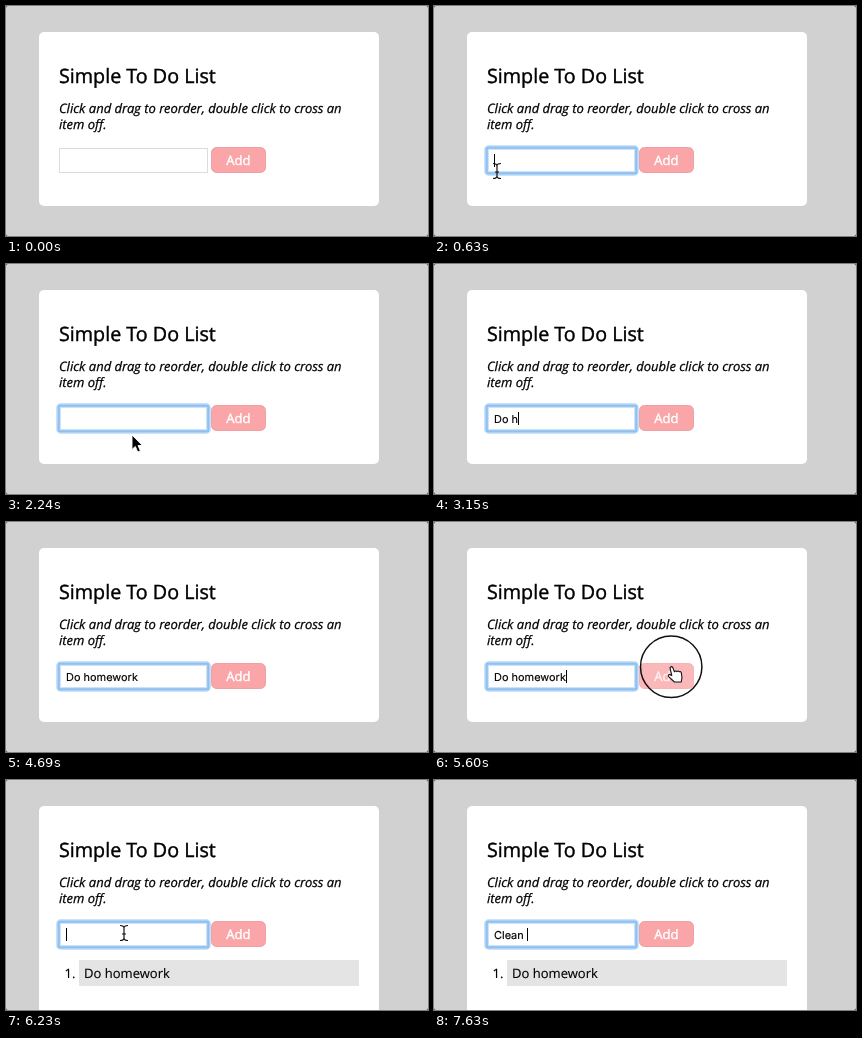
Animation of 422 by 230 pixels, one loop 8000 ms. Source, as an HTML page:

```html
<!DOCTYPE html>
<html lang="en">
<head>
<meta charset="utf-8">
<title>Simple To Do List</title>
<style>
  html, body { margin: 0; width: 100%; height: 100%; overflow: hidden; background: #333; }
  svg { display: block; width: 422px; height: 230px; border-radius: 2px; font: 13.03px "Open Sans", sans-serif; text-rendering: geometricPrecision; }
  text { stroke: #000; stroke-width: .15px; }
  .title { font-size: 19.7px; stroke-width: .4px; }
  .note { font-style: italic; stroke-width: .25px; }
  #typed { font: 10.95px Inter, sans-serif; white-space: pre; }
  #face { fill: #faa5a8; stroke: #f0a0a4; }
  #label { fill: #fff; stroke: #fff; stroke-width: .45px; }
  .hover #face { fill: #fbb8ba; stroke: #f7b3b6; }
  .hover #label { fill: #fff0f0; stroke: #fff0f0; }
  .off { visibility: hidden; }
</style>
</head>
<body>
<svg id="stage" viewBox="0 0 422 230">
  <rect width="422" height="230" fill="#d1d1d1"/>
  <rect id="card" x="33" y="26" width="340" height="174" rx="5" fill="#fff"/>
  <text class="title" x="53" y="77">Simple To Do List</text>
  <text class="note" x="53" y="107">Click and drag to reorder, double click to cross an</text>
  <text class="note" x="53" y="123">item off.</text>

  <rect x="53.5" y="142.5" width="148" height="24" fill="#fff" stroke="#dcdce0"/>
  <g id="ring" fill="none" stroke="#82bbf3">
    <rect x="52.5" y="141.5" width="150" height="26" rx="2.5" stroke-width="5" opacity=".42"/>
    <rect x="52.5" y="141.5" width="150" height="26" rx="1.5" stroke-width="2" opacity=".85"/>
  </g>
  <text id="typed" x="60" y="159" xml:space="preserve"></text>
  <rect id="caret" y="148" width="1" height="13"/>

  <g id="button">
    <rect id="face" x="205.5" y="141.5" width="54" height="25" rx="5"/>
    <text id="label" x="220.3" y="159">Add</text>
  </g>

  <g id="item">
    <rect x="73" y="180" width="280" height="26" fill="#e4e4e4"/>
    <text x="58.5" y="198">1.</text>
    <text x="78" y="198">Do homework</text>
  </g>

  <g id="pointer">
    <circle id="press" r="30.7" fill="none" stroke="#111" stroke-width="1.5"/>
    <path id="arrow" d="M0 0V14.5L3.3 11.4L5.8 17L8.4 15.9L6 10.5H10.4Z" stroke="#fff" stroke-width=".9"/>
    <path id="beam" d="M-4-7.5Q0-7.5 0-5Q0-7.5 4-7.5M0-5V5M-4 7.5Q0 7.5 0 5Q0 7.5 4 7.5M-2 1H2" fill="none" stroke="#111" stroke-width="1.2"/>
    <path id="hand" d="M-1.2 1.1Q.1-1.1 1.6.9L3.2 5.1Q4.6 3.5 5.7 4.9Q7 3.7 8 5.1Q9.8 4.4 10.2 6.5L10.8 11L10 15.3H3.2L-2.6 9.9Q-3.6 7.7-1.4 7.8L.6 8.9Z" fill="#fff" stroke="#111" stroke-width="1.1" stroke-linejoin="round"/>
  </g>
</svg>
<script>
  const LOOP = 8000, STEP = 70;
  const $ = id => document.getElementById(id);
  const show = (id, on) => $(id).classList.toggle('off', !on);
  const within = (t, a, b) => t >= a && t < b;

  const ADDED = 5740, FOCUS = 420;
  const entries = [
    { text: 'Do homework', until: ADDED,
      keys: [2520, 2660, 2870, 3150, 3360, 3430, 3570, 3780, 3990, 4060, 4200] },
    { text: 'Clean ', until: LOOP, keys: [6930, 7070, 7140, 7350, 7490, 7630] }
  ];
  // Each move: start, end, from, bend, to
  const moves = [
    [70, 420, [190, 32], [110, 130], [63, 165]],
    [910, 1470, [63, 165], [95, 146], [126, 171]],
    [5110, 5480, [126, 171], [185, 168], [237.2, 144.7]],
    [5950, 6230, [237.2, 144.7], [180, 146], [118, 153]]
  ];
  const visible = [[70, 2520], [5110, 6930]];
  const presses = [[420, 630], [5530, 5740]];
  const caretOn = [[630, 1190], [1750, 2240], [2520, 4690], [5180, 5690], [6190, 6720], [6930, LOOP]];
  const any = (spans, t) => spans.some(([a, b]) => within(t, a, b));

  function position(t) {
    const [a, b, p, q, r] = moves.filter(m => t >= m[0]).pop() || moves[0];
    const k = Math.min(1, Math.max(0, (t - a) / (b - a)));
    const e = k * k * (3 - 2 * k);
    return p.map((v, i) => (1 - e) ** 2 * v + 2 * e * (1 - e) * q[i] + e * e * r[i]);
  }

  function draw(t) {
    const entry = entries.find(e => t < e.until);
    $('typed').textContent = entry.text.slice(0, entry.keys.filter(k => k <= t).length);
    $('caret').setAttribute('x', Math.round(60 + $('typed').getComputedTextLength()));
    show('caret', any(caretOn, t));
    show('ring', t >= FOCUS);

    const added = t >= ADDED;
    show('item', added);
    $('card').setAttribute('height', added ? 220 : 174);

    const [x, y] = position(t), shown = any(visible, t);
    const inRow = within(y, 142, 167);
    const overField = inRow && within(x, 53, 202), overButton = inRow && within(x, 205, 260);
    $('pointer').setAttribute('transform', `translate(${x} ${y})`);
    show('arrow', shown && !overField && !overButton);
    show('beam', shown && overField);
    show('hand', shown && overButton);
    show('press', any(presses, t));
    $('button').classList.toggle('hover', shown && overButton);
  }

  const start = performance.now();
  function tick() {
    const t = (performance.now() - start) % LOOP;
    draw(Math.floor(t / STEP) * STEP);
    requestAnimationFrame(tick);
  }
  tick();
</script>
</body>
</html>
```
